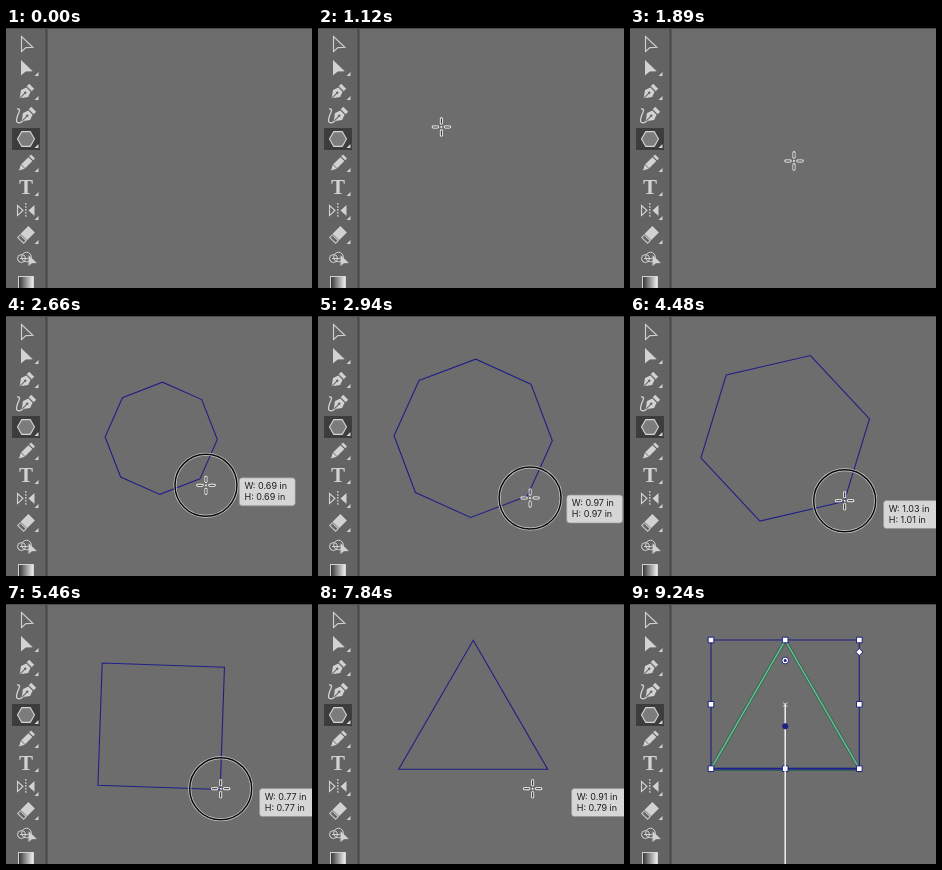
An HTML page with a canvas that plays this animation: 306 by 260 pixels, repeating every 9310 ms.

```html
<!DOCTYPE html>
<html lang="en">
<head>
<meta charset="utf-8">
<title>Polygon tool</title>
<style>
  html, body { margin: 0; width: 100%; height: 100%; overflow: hidden; background: #6d6d6d; }
  canvas { display: block; width: 306px; height: 260px; }
</style>
</head>
<body>
<canvas id="stage"></canvas>
<script>
const W = 306, H = 260, LOOP = 9310, TICK = 70;
const BLUE = '#201f86', ICON = '#d2d2d2', PANEL = '#636363';
const INCH = 0.00616;               // inches per pixel
const CENTER = { x: 155.2, y: 122.3 };
const DRAG = { start: 2240, end: 3220, lag: 85, radius: 86.5 };
const SIDE_DROPS = [4060, 4480, 4970, 5460, 6160];
const RELEASE = 7840;

const canvas = document.getElementById('stage');
const ctx = canvas.getContext('2d');
const ratio = window.devicePixelRatio || 1;
canvas.width = W * ratio;
canvas.height = H * ratio;

const linear = k => k;
const easeIn = k => k ** 1.3;
const easeOut = k => 1 - (1 - k) ** 2.5;
const rad = deg => deg * Math.PI / 180;

function progress(t, start, end, ease = linear) {
  return ease(Math.min(1, Math.max(0, (t - start) / (end - start))));
}

// Pointer moves: start, end, target, easing
const ENTRY = { x: 162, y: 258 };
const MOVES = [
  [140, 700, 140, 118, linear],
  [770, 840, 111, 89, linear],
  [1050, 1470, 185, 149, linear],
  [1470, 1610, 173, 144, linear],
  [1820, 1960, 155, 122, linear],
  [DRAG.start, DRAG.end, 214.7, 184.8, easeOut],
  [8750, 9240, 155, 280, easeIn]
];

function pointerAt(t) {
  let { x, y } = ENTRY;
  for (const [start, end, tx, ty, ease] of MOVES) {
    const k = progress(t, start, end, ease);
    x += (tx - x) * k;
    y += (ty - y) * k;
  }
  return { x, y };
}

function trace(points, closed = true) {
  ctx.beginPath();
  points.forEach(([x, y], i) => i ? ctx.lineTo(x, y) : ctx.moveTo(x, y));
  if (closed) ctx.closePath();
}

function stroke(color, width) {
  ctx.strokeStyle = color;
  ctx.lineWidth = width;
  ctx.stroke();
}

function fill(color) {
  ctx.fillStyle = color;
  ctx.fill();
}

function rect(color, x, y, w, h) {
  ctx.fillStyle = color;
  ctx.fillRect(x, y, w, h);
}

function disc(x, y, r) {
  ctx.beginPath();
  ctx.arc(x, y, r, 0, Math.PI * 2);
}

function at(x, y, angle, draw) {
  ctx.save();
  ctx.translate(x, y);
  ctx.rotate(angle);
  draw();
  ctx.restore();
}

function ngon(cx, cy, r, n, angle) {
  return Array.from({ length: n }, (_, i) => {
    const a = angle + i * 2 * Math.PI / n;
    return [cx + r * Math.cos(a), cy + r * Math.sin(a)];
  });
}

function arrow(x, y, size) {
  trace([[x, y], [x, y + size], [x + size * 0.3, y + size * 0.74], [x + size * 0.76, y + size * 0.72]]);
}

function nib(x, y) {
  at(x, y, Math.PI / 4, () => {
    trace([[0, 9], [-5, 2], [-3, -3.5], [3, -3.5], [5, 2]]);
    fill(ICON);
    rect(ICON, -3.5, -8, 7, 3.3);
    trace([[0, 9], [0, 1.5]], false);
    stroke(PANEL, 1);
    disc(0, 1, 1.2);
    fill(PANEL);
  });
}

function pencil(x, y) {
  at(x, y, Math.PI / 4, () => {
    rect(ICON, -2.8, -10, 5.6, 2.7);
    rect(ICON, -2.8, -6.2, 5.6, 10.2);
    trace([[-2.8, 4.5], [2.8, 4.5], [0, 10]]);
    fill(ICON);
  });
}

function toolIcons() {
  arrow(15.5, 8.5, 15);
  stroke(ICON, 1.1);
  arrow(15, 32, 15.5);
  fill(ICON);

  nib(20, 64);
  nib(22, 87);
  ctx.beginPath();
  ctx.moveTo(11, 81);
  ctx.bezierCurveTo(18, 80, 8, 90, 11, 94);
  ctx.quadraticCurveTo(13, 96, 17, 93);
  stroke(ICON, 1.3);

  rect('#3d3d3d', 6, 100, 28, 22);
  trace(ngon(20, 111, 8.5, 6, 0));
  fill('#7c7c7c');
  stroke(ICON, 1.1);

  pencil(20, 135.5);

  ctx.font = 'bold 21px "Liberation Serif", Times, serif';
  ctx.textAlign = 'center';
  ctx.fillStyle = ICON;
  ctx.fillText('T', 20, 166);
  ctx.textAlign = 'left';

  trace([[11.5, 177.5], [17, 182.5], [11.5, 187.5]]);
  stroke(ICON, 1.1);
  trace([[28.5, 177], [22.5, 182.5], [28.5, 188]]);
  fill(ICON);
  for (let y = 175; y < 190; y += 3) rect(ICON, 19.2, y, 1.2, 1.8);

  at(20, 207, -Math.PI / 4, () => {
    rect(ICON, -3, -4.6, 11, 9.2);
    ctx.beginPath();
    ctx.rect(-7.5, -4.1, 3.6, 8.2);
    stroke(ICON, 1);
  });

  disc(15.5, 230.5, 4);
  stroke(ICON, 1);
  disc(20.5, 229, 4.8);
  stroke(ICON, 1);
  rect(ICON, 14, 230, 8, 1);
  arrow(22.5, 227, 11);
  fill(ICON);

  const shade = ctx.createLinearGradient(13, 0, 27, 0);
  shade.addColorStop(0, '#383838');
  shade.addColorStop(1, '#eee');
  rect(ICON, 12, 248, 16, 12);
  rect(shade, 13, 249, 14, 11);

  for (let y = 48; y <= 216; y += 24) {
    if (y === 96) continue;         // this tool has no flyout
    trace([[32.5, y - 4], [32.5, y], [28.5, y]]);
    fill(ICON);
  }
}

function backdrop() {
  rect('#6d6d6d', 0, 0, W, H);
  rect(PANEL, 0, 0, 40, H);
  rect('#484848', 39.5, 0, 2, H);
  rect('#4b4b4b', 0, 0, W, 1);
  toolIcons();
}

function crosshair({ x, y }) {
  ctx.lineCap = 'round';
  for (const [color, width] of [['#fff', 2.9], ['#1c1c1c', 1.1]]) {
    for (let i = 0; i < 4; i++) {
      at(x, y, i * Math.PI / 2, () => {
        trace([[3.8, 0], [8.2, 0]], false);
        stroke(color, width);
      });
    }
  }
  ctx.lineCap = 'butt';
  rect('#fff', x - 0.8, y - 0.8, 1.6, 1.6);
}

function pressRing({ x, y }) {
  disc(x, y, 31);
  stroke('rgba(235,235,235,.75)', 3);
  stroke('#0c0c0c', 1.5);
}

function sizeTip(corner, points) {
  const span = axis => {
    const v = points.map(p => p[axis]);
    return (Math.floor((Math.max(...v) - Math.min(...v)) * INCH * 100) / 100).toFixed(2);
  };
  const x = corner.x + 39.3, y = corner.y - 1;
  ctx.beginPath();
  ctx.roundRect(x, y, 56, 28, 3);
  fill('#d6d6d6');
  stroke('#929292', 0.7);
  ctx.font = '9px Inter, "Liberation Sans", sans-serif';
  ctx.fillStyle = '#1c1c1c';
  ctx.fillText(`W: ${span(0)} in`, x + 5.2, y + 11);
  ctx.fillText(`H: ${span(1)} in`, x + 5.2, y + 22);
}

// The outline trails the pointer; its first vertex is the dragged corner
function shapeAt(t) {
  const k = progress(t - DRAG.lag, DRAG.start, DRAG.end, easeOut);
  const sides = 8 - SIDE_DROPS.filter(drop => drop <= t).length;
  const r = DRAG.radius * k, turn = rad(45 + 2 * k);
  const [[x, y]] = ngon(CENTER.x, CENTER.y, r, 1, turn);
  const upright = t >= 7280;
  const points = upright
    ? ngon(CENTER.x, CENTER.y, 86, sides, -Math.PI / 2)
    : ngon(CENTER.x, CENTER.y, r, sides, turn);
  return { points, corner: { x, y }, r };
}

function handle(x, y, r, angle) {
  trace(ngon(x, y, r, 4, angle));
  fill('#fff');
  stroke(BLUE, 1);
}

function selection(points) {
  const xs = [81, 155.2, 229.3], ys = [36, 100.3, 164.7];
  const [left, mid, right] = xs, [top, , bottom] = ys;
  trace(points);
  stroke('#35604f', 3.2);
  stroke('#62bd8e', 1.5);
  ctx.beginPath();
  ctx.rect(left, top, right - left, bottom - top);
  stroke(BLUE, 1.1);
  trace([[left, bottom], [right, bottom]], false);
  stroke(BLUE, 2);

  xs.forEach((x, i) => ys.forEach((y, j) => {
    if (i !== 1 || j !== 1) handle(x, y, 4, Math.PI / 4);
  }));
  handle(right, 48, 3.6, 0);

  disc(mid, 56.5, 3.4);
  fill('#fff');
  stroke(BLUE, 1);
  disc(mid, 56.5, 1.5);
  fill(BLUE);
}

function centerGuide() {
  trace([[155.2, 101], [155.2, H]], false);
  stroke('#f2f2f2', 1.5);
  for (const s of [1, -1]) {
    trace([[153.2, 100.5 - 2 * s], [157.2, 100.5 + 2 * s]], false);
    stroke('#f2f2f2', 1);
  }
}

function draw(t) {
  ctx.setTransform(ratio, 0, 0, ratio, 0, 0);
  backdrop();
  const pointer = pointerAt(t);
  const { points, corner, r } = shapeAt(t);

  if (t > RELEASE) {
    selection(points);
    if (t >= 9170) centerGuide();
    disc(CENTER.x, CENTER.y, 3);
    fill(BLUE);
  } else if (r > 2) {
    trace(points);
    stroke(BLUE, 1.1);
    sizeTip(corner, points);
  }
  if (t >= 2100 && t < RELEASE) pressRing(pointer);
  if (t >= 140) crosshair(pointer);
}

function frame() {
  draw(Math.floor(performance.now() % LOOP / TICK) * TICK);
  requestAnimationFrame(frame);
}
frame();
</script>
</body>
</html>
```
